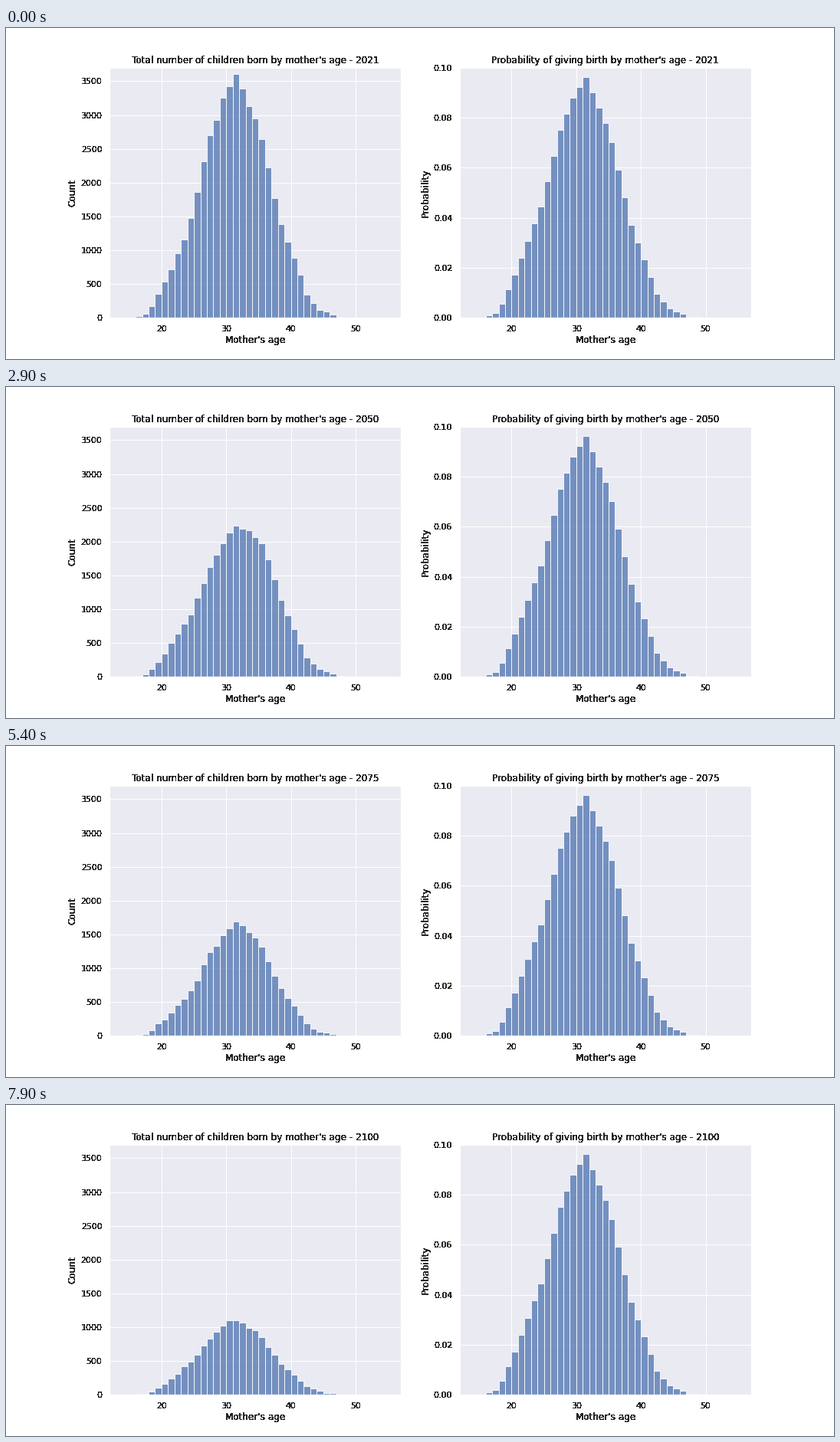
A matplotlib script for the animation above (8000 ms loop, 1080 by 432 pixels).

```python
import matplotlib.pyplot as plt
import numpy as np
from matplotlib.animation import FuncAnimation
from matplotlib.colors import to_rgba

FIRST_YEAR, LAST_YEAR = 2021, 2100
AGES = np.arange(14, 55)

# Key points: (age, births per 10,000 women)
FERTILITY = [(15, 0), (16, 9), (17, 18), (18, 54), (20, 172), (24, 444),
             (27, 750), (29, 879), (31, 964), (34, 778), (35, 701),
             (38, 370), (42, 95), (44, 36), (47, 3), (50, 0)]

# Key points: (birth year, hundreds of women at age 30)
COHORTS = [(1975, 355), (1982, 385), (1991, 375), (1995, 350), (1998, 312),
           (2002, 302), (2009, 315), (2013, 308), (2019, 235), (2023, 214),
           (2034, 188), (2041, 185), (2046, 170), (2054, 137), (2062, 125),
           (2067, 118), (2076, 110), (2080, 93), (2085, 84)]

ATTRITION = 0.0025  # yearly loss of women from each cohort
JITTER = 0.6        # random spread, in units of sqrt(count)

plt.rcParams.update({
    "font.family": "DejaVu Sans", "font.size": 12,
    "axes.titlesize": 12, "axes.labelsize": 12,
    "xtick.labelsize": 11, "ytick.labelsize": 11,
    "text.color": ".15", "axes.labelcolor": ".15",
    "xtick.color": ".15", "ytick.color": ".15",
    "xtick.major.size": 6, "ytick.major.size": 6,
    "xtick.bottom": False, "ytick.left": False,
    "axes.facecolor": "#EAEAF2", "axes.edgecolor": "white",
    "axes.linewidth": 1.25, "axes.axisbelow": True, "axes.grid": True,
    "grid.color": "white", "grid.linewidth": 1,
})


def curve(x, points):
    return np.interp(x, *zip(*points))


PROB = curve(AGES, FERTILITY) / 1e4


def births(year):
    """Each cohort moves one age to the right every year."""
    women = 100 * curve(year - AGES, COHORTS) * (1 - ATTRITION * (AGES - 30))
    expected = women * PROB
    noise = np.random.default_rng(year).standard_normal(len(AGES))
    return np.maximum(expected + JITTER * noise * np.sqrt(expected), 0).round()


def harden(img, dpi):
    """Make touched pixels opaque, for heavy lettering."""
    img = img.copy()
    img[..., 3] = img[..., 3] > 0.12
    return img, 0, 0


def make_panel(ax, heights, ylabel, top, step):
    bars = ax.bar(AGES, heights, width=1, align="edge", linewidth=0.84,
                  facecolor=to_rgba("#4C72B0", 0.75), edgecolor="white")
    ax.set(xlabel="Mother's age", ylabel=ylabel, xlim=(11.95, 57.05),
           ylim=(0, top), xticks=range(20, 51, 10),
           yticks=np.arange(0, top + step / 100, step))
    for artist in (ax.xaxis, ax.yaxis, ax.title):
        artist.set_agg_filter(harden)
    return bars


fig, (left, right) = plt.subplots(1, 2, figsize=(15, 6), dpi=72,
                                  facecolor="white")
fig.subplots_adjust(left=0.125, right=0.9, bottom=0.125, top=0.88, wspace=0.2)
count_bars = make_panel(left, births(FIRST_YEAR), "Count", 3700, 500)
make_panel(right, PROB, "Probability", 0.1, 0.02)


def update(i):
    year = FIRST_YEAR + i
    for bar, height in zip(count_bars, births(year)):
        bar.set_height(height)
    left.set_title(f"Total number of children born by mother's age - {year}")
    right.set_title(f"Probability of giving birth by mother's age - {year}")


anim = FuncAnimation(fig, update, frames=LAST_YEAR - FIRST_YEAR + 1,
                     init_func=lambda: None, interval=100, repeat=True,
                     repeat_delay=0)
plt.show()
```
